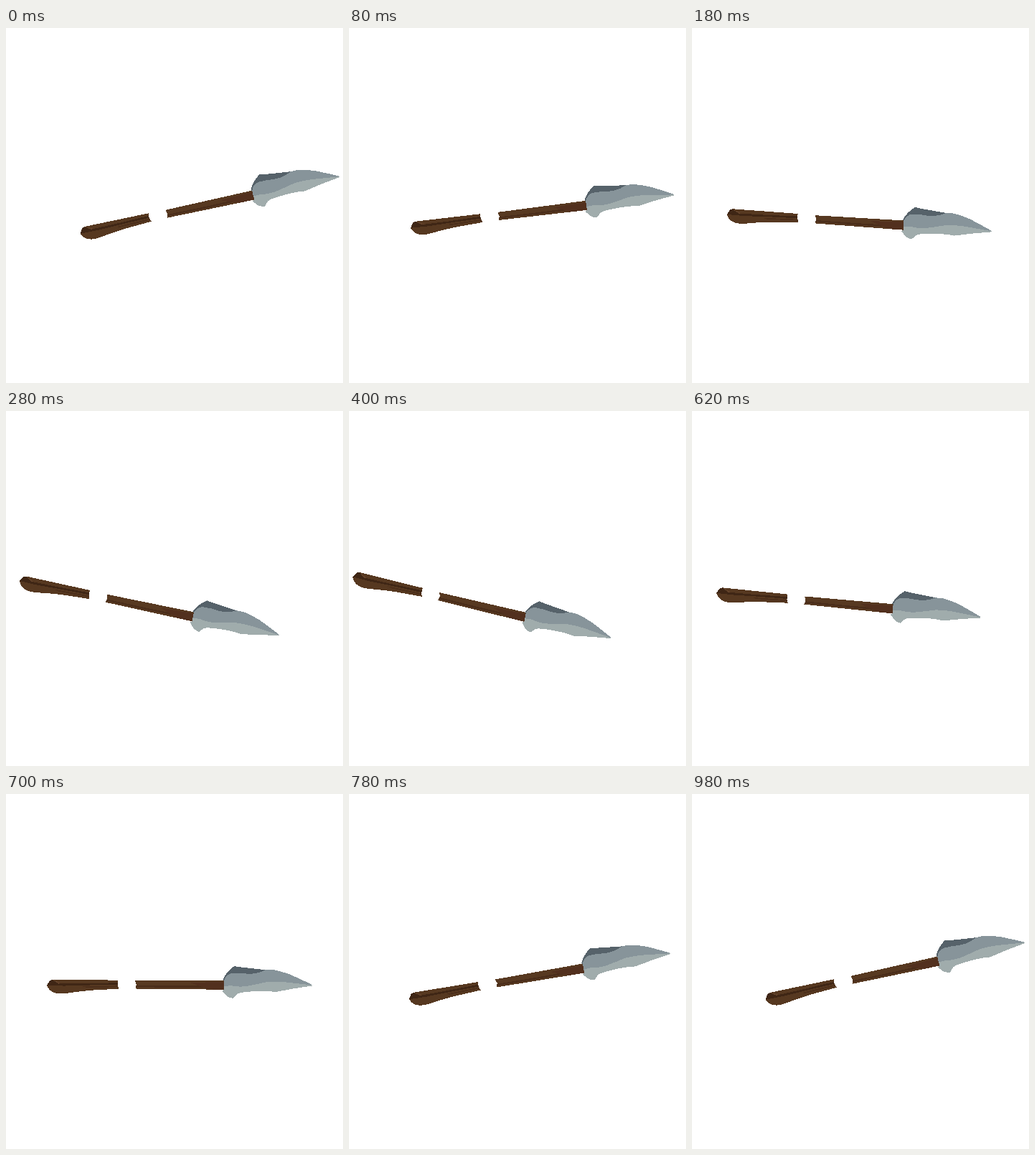
Recreate the animation shown at these times as an HTML page. Size 470x495 px, loop 1000 ms.

```html
<!DOCTYPE html>
<html lang="en">
<head>
<meta charset="utf-8">
<title>Spear</title>
<style>
  html, body { margin: 0; width: 100%; height: 100%; overflow: hidden; background: #fff; }
  svg { display: block; width: 100%; height: 100%; }
</style>
</head>
<body>
<svg viewBox="0 0 470 495" shape-rendering="crispEdges">
  <g id="spear">
    <!-- grip -->
    <path fill="#563820" d="M-.5 0L3.6 -6.8L7.5 -8.2L98.4 -7.2L98 -1L100 4.8L61 6.8Q40 8.8 28 10.8Q20 12 13.5 11.2Q5 9.2 1.5 3.8Z"/>
    <path fill="#3f2615" d="M-.5 0L3.6 -6.8L7.5 -8.2L16 -2.6L50 -2.6L98 -3.6L98.4 -.8L60 -.4L24 .6Z"/>
    <path fill="#64432b" d="M7 -8L9 -7.6L19 -2.8L16 -2.4Z"/>
    <path fill="#4b2e1a" d="M50 1.6L98.4 .6L99 2.4L56 3.2Z"/>
    <!-- shaft -->
    <path fill="#573921" d="M122.5 -6.5L246.5 -7L247 6.2L122.8 4.7L124.4 -1Z"/>
    <path fill="#4a2d1a" d="M124.2 .2L180 .8L247 .4L247 3L180 3.2L123.6 2.4Z"/>
    <path fill="#52301e" d="M200 -3.4L247 -5L247 6.2L225 5.8Z"/>
    <!-- blade -->
    <path fill="#56626a" d="M245 -8Q250 -19 260.9 -26.5L272 -24.8L305 -21.2L296 -14L254 -10L247 -5Z"/>
    <path fill="#87949a" d="M246.5 3L246.5 -7Q250 -15 257 -16.6L270 -16.8Q281 -15.2 289 -16.2Q297 -17.4 304.5 -21.2Q311 -21.8 317 -21Q328 -18.7 339 -14.6Q355 -7.5 369 -.6L369 1L330 -1L280 5Z"/>
    <path fill="#a0acac" d="M246.8 1.5L256 .6Q266 3 278 1.5Q292 -1 306 -4.3Q322 -5.6 340 -3.2L369.3 .2L369 1.2L342 5.2Q330 7.6 318 9.6Q308 8 297 8.4Q284 8.8 276 9.7Q265 10.8 263.5 13.5L259 18.4Q251 17.2 248 12.4L244 7.8L246.8 6Z"/>
  </g>
</svg>
<script>
const LOOP = 1000, STEP = 20;

// time, butt x, butt y, angle in degrees
const keys = [
  [0, 104, 286.6, -12.45],
  [180, 49, 260, 3.6],
  [340, 8.6, 229.8, 14],
  [400, 5.5, 231.3, 13.25],
  [540, 18, 243.7, 8.9],
  [700, 57.5, 267, -0.1],
  [780, 84.3, 286.2, -10],
  [980, 103, 286.6, -12.45]
];

const count = keys.length;
const spear = document.getElementById('spear');

// Key at any index, with the time carried on across loops
function keyAt(i, col) {
  const turn = Math.floor(i / count);
  const key = keys[i - turn * count];
  return col ? key[col] : key[0] + turn * LOOP;
}

const span = i => keyAt(i + 1, 0) - keyAt(i, 0);
const slope = (i, col) => (keyAt(i + 1, col) - keyAt(i, col)) / span(i);

// Monotone tangent: flat at turning points
function tangent(i, col) {
  const a = slope(i - 1, col), b = slope(i, col);
  if (a * b <= 0) return 0;
  const u = span(i - 1), v = span(i);
  return 3 * (u + v) / ((u + 2 * v) / a + (2 * u + v) / b);
}

function sample(t, col) {
  let i = count - 1;
  while (keys[i][0] > t) i--;
  const h = span(i), s = (t - keys[i][0]) / h;
  const p = keyAt(i, col), q = keyAt(i + 1, col);
  const ease = s * s * (3 - 2 * s);
  return p + (q - p) * ease
    + h * s * (1 - s) * ((1 - s) * tangent(i, col) - s * tangent(i + 1, col));
}

function draw(t) {
  const x = sample(t, 1), y = sample(t, 2), angle = sample(t, 3);
  spear.setAttribute('transform', `translate(${x} ${y}) rotate(${angle})`);
}

function tick(now) {
  draw(Math.floor(now % LOOP / STEP) * STEP);
  requestAnimationFrame(tick);
}

draw(0);
requestAnimationFrame(tick);
</script>
</body>
</html>
```
